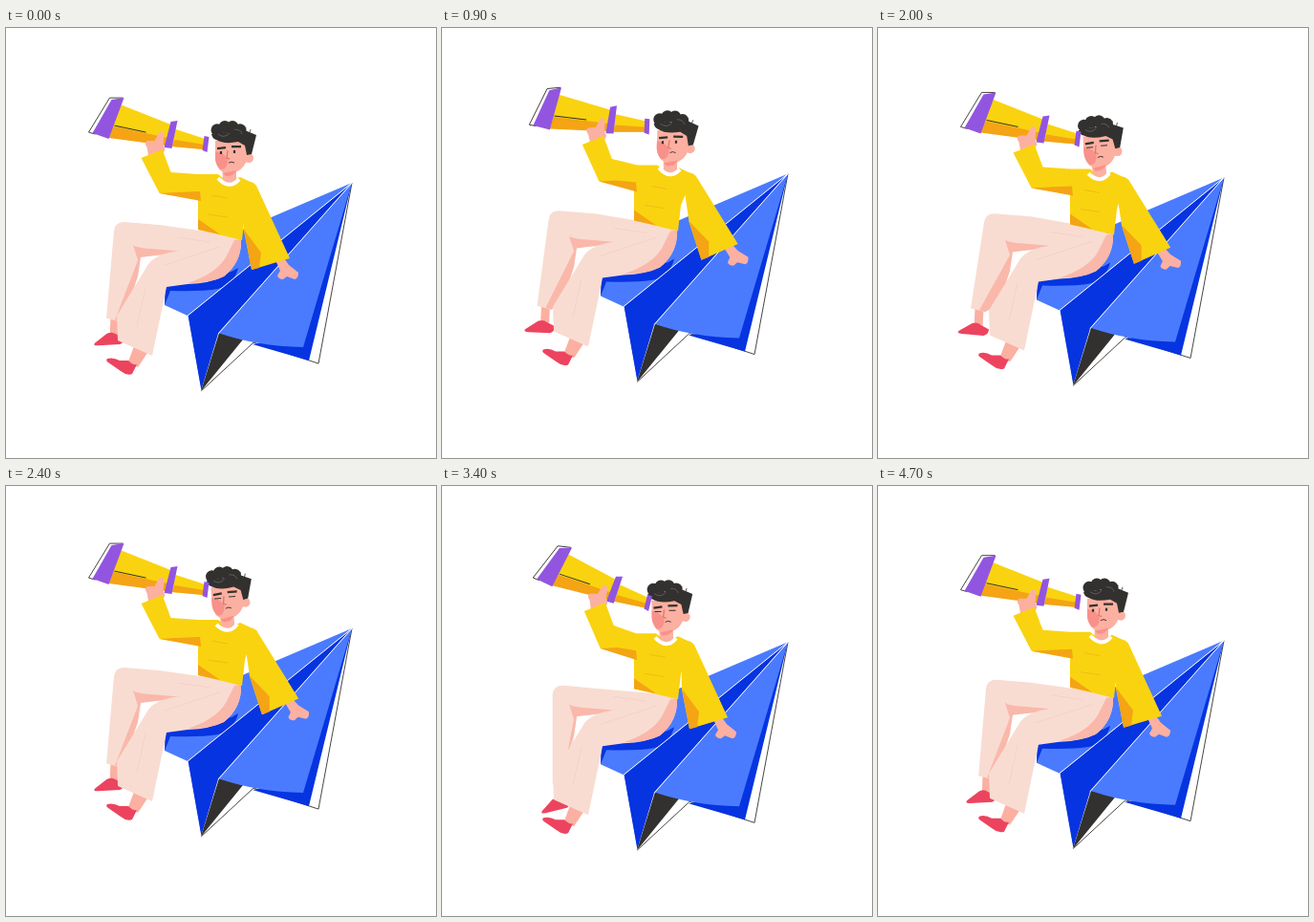
An HTML page with a canvas for the animation above (4.8 s loop, 450 px wide and 450 px high).

```html
<!DOCTYPE html>
<html>
<head>
<meta charset="utf-8">
<style>
html, body { margin: 0; width: 100%; height: 100%; overflow: hidden; background: #fff; }
canvas { display: block; }
</style>
</head>
<body>
<canvas id="stage" width="450" height="450"></canvas>
<script>
const ctx = document.getElementById('stage').getContext('2d');
const LOOP = 4800, STEP = 100, { sin, cos, PI } = Math;
const BRIGHT = '#4a7bff', DARK = '#0634e0', YELLOW = '#f9d310', ORANGE = '#f4a414',
  PURPLE = '#9255e0', CLOTH = '#f8dcd2', PINK = '#fab8aa', SKIN = '#fbb0a1',
  BLUSH = '#f8918a', RED = '#ec445f', INK = '#33312f';

const smooth = u => (u = Math.min(1, Math.max(0, u))) * u * (3 - 2 * u);
// Eases from 0 to 1 after `from`, and back to 0 after `to`
const hold = (t, from, to, ease) => smooth((t - from) / ease) - smooth((t - to) / ease);

function poseAt(t) {
  const a = 2 * PI * t / LOOP;
  const rise = hold(t, 900, 1400, 400) + hold(t, 2400, 3200, 400);
  const duck = hold(t, 400, 900, 500);
  const back = hold(t, 1600, 3900, 400);
  return {
    dy: .3 + 6.5 * cos(3 * a) - 1.7 * cos(2 * a),
    swing: -9 * sin(a) + 4 * sin(2 * a),
    arm: -7 * hold(t, 300, 2500, 600),
    lean: 4 * rise + 3.5 * duck,
    tube: { x: 209.5 + 13 * rise + 5.5 * duck, y: 117 - rise - 9 * duck, turn: 13 * rise - 5 * duck },
    head: { x: 6 * rise + 5 * duck - 2 * back, y: -duck, turn: 6 * rise + 2 * duck - 4 * back },
    squint: t > 1100 && t < 3500
  };
}

function fill(color, path) {
  ctx.fillStyle = color;
  ctx.fill(new Path2D(path));
}
function line(color, width, path) {
  ctx.strokeStyle = color;
  ctx.lineWidth = width;
  ctx.stroke(new Path2D(path));
}
function disc(color, x, y, r) {
  ctx.fillStyle = color;
  ctx.beginPath();
  ctx.arc(x, y, r, 0, 2 * PI);
  ctx.fill();
}
// Moves the pivot (px, py) to (x, y) and turns around it
function group(x, y, deg, px, py, draw) {
  ctx.save();
  ctx.translate(x, y);
  ctx.rotate(deg * PI / 180);
  ctx.translate(-px, -py);
  draw();
  ctx.restore();
}

function plane() {
  fill('#fff', 'M362 157L327 346L260 324L204 375L190 296Z');
  line(INK, .9, 'M362 157L327 346L259 324L204 375');
  fill(BRIGHT, 'M362 157L245 207L167 264L166 285L190 296Z');
  fill(DARK, 'M167 262L236 250L243 246Q239 263 222 268Q205 271 172 270L166 285Z');
  fill(DARK, 'M362 157L190 296L204 375L222 315Z');
  fill(INK, 'M223 314L248 321L204 375Z');
  fill(DARK, 'M362 157L317 343L258 326L300 318Z');
  fill(BRIGHT, 'M362 157L311 329Q262 328 222 314Z');
  line('#fff', 1, 'M362 157L190 296L204 375M362 157L222 315');
}

function legs(swing) {
  const footX = 109 + swing, footY = 320.5 + swing * .6;
  const kneeX = 113 + swing * .25, kneeY = 198 + swing * .4;
  const cuffX = footX + 4, cuffY = footY - 20;
  line(SKIN, 9, `M${cuffX + 1} ${cuffY - 3}L${footX + 4} ${footY - 1}`);
  group(footX, footY, -3 - swing, 0, 0, () =>
    fill(RED, 'M-16 3L-3 -6Q3 -8 6 -5L15 -1Q15 4 10 6L-13 6Q-19 6 -16 3Z'));
  fill(CLOTH, `M246 213L160 ${kneeY + 3}L${kneeX + 11} ${kneeY}Q${kneeX + 1} ${kneeY} ${kneeX} ${kneeY + 9}
    L${cuffX - 8} ${cuffY - 2}L${cuffX + 7} ${cuffY + 2}L141 234L185 232Z`);
  fill(PINK, `M${cuffX + 7} ${cuffY + 2}L126 290L138 255L141 235L187 229L152 226
    Q136 225 133 222L138 238L${cuffX + 1} ${cuffY}Z`);

  fill(SKIN, 'M134 328L148 335L138 350L128 344Z');
  fill(RED, 'M106 341Q112 339 119 343L128 343Q133 348 137 347L132 357Q126 359 120 354L107 345Q104 343 106 341Z');
  fill(CLOTH, `M246 216Q247 240 228 255Q214 262 190 263L168 266L153 338L117 322L116 296
    L149 242Q157 231 182 228L210 210Z`);
  fill(PINK, 'M246 216Q247 240 228 255Q214 262 190 262Q220 252 230 235L239 217Z');
  line('#f3cdc1', .7, 'M166 243L224 224M146 267L137 307M180 214L214 219');
}

function torso(lean, arm) {
  fill(YELLOW, `M${200 + lean} 148L${222 + lean} 148Q${233 + lean} 158 ${245 + lean} 151L${260 + lean} 158
    L250 190L247 217Q222 211 201 206L201 174Z`);
  fill(ORANGE, 'M201 195L224 211L201 206Z');
  line('#e8ad17', .6, `M${216 + lean} 170L${232 + lean} 173M212 190L232 193`);
  group(256 + lean, 158, arm, 256, 158, () => {
    fill(SKIN, 'M282 238L291 236L296 243L306 251Q306 257 302 258L294 255L290 258Q285 258 284 254L287 249Z');
    fill(YELLOW, 'M248 160Q255 152 262 160L297 236L257 248L249 207Z');
    fill(ORANGE, 'M249 206L267 230L265 246L257 248Z');
  });
}

function head({ x, y, turn }, squint) {
  group(234 + x, 152 + y, turn, 234, 152, () => {
    fill(SKIN, 'M226 138L241 136L241 154Q234 162 227 154Z');
    line('#fff', 4, 'M222 152Q234 165 244 153');
    disc(SKIN, 254, 131, 5);
    fill(SKIN, 'M219 113L254 112L253 130Q249 146 234 147Q221 147 219 132Z');
    fill(BLUSH, 'M219 124Q230 126 232 134Q231 144 224 143Q219 137 219 131Z');
    fill(BLUSH, 'M227 147L241 144Q239 150 230 150Z');
    for (let i = 0; i < 4; i++) disc(INK, 221 + 8 * i, 104 - 6 * sin(PI * (i + .5) / 4), 6.5);
    fill(INK, 'M215 106L250 102L262 107L257 127L252 128L250 118L243 114Q228 117 220 112Q216 111 215 106Z');
    line(INK, .8, 'M252 107Q249 102 251 99M254 107L256 101');
    line('#777', .6, 'M222 106Q228 111 234 105M239 101Q246 101 247 106');
    line(INK, 2.3, 'M221 121L230 120M236 119L246 119');
    if (squint) line(INK, 1, 'M222 125L229 125M237 124L244 124');
    else line(INK, 2.2, 'M225 124V127M239 123V126');
    line('#e2716b', 1.2, 'M232 123L231 131L234 132');
    line(INK, .9, 'M233 136Q236 134 239 136');
  });
}

function telescope({ x, y, turn }) {
  group(x, y, turn, 210, 117, () => {
    fill('#fff', 'M109 68L123 68L105 110L87 105Z');
    line(INK, .9, 'M123 68L109 68L87 104L94 106');
    fill(YELLOW, 'M120 75L173 96L168 118L108 109Z');
    fill(ORANGE, 'M113 98L170 110L168 118L108 110Z');
    line(INK, 1, 'M114 97L147 104');
    fill(YELLOW, 'M178 101L209 111L207 122L174 119Z');
    fill(ORANGE, 'M177 112L208 117L207 122L174 119Z');
    fill(PURPLE, 'M111 70L124 68L108 111L91 105Z');
    fill(PURPLE, 'M173 93L180 92L174 121L166 120Z');
    fill(PURPLE, 'M208 108L213 109L211 125L206 123Z');
  });
}

// The hand holds a fixed point of the telescope, the elbow follows
function raisedArm(lean, { x, y, turn }) {
  const a = turn * PI / 180;
  const handX = x - 52 * cos(a) + 4 * sin(a), handY = y - 52 * sin(a) - 4 * cos(a);
  const elbowX = 161 + (handX - 158) * .7, elbowY = 168 + (handY - 113) * .7;
  group(handX, handY, turn * .4, 0, 0, () =>
    fill(SKIN, 'M-8 18L-10 7Q-14 1 -9 0L-2 0L3 -9Q7 -11 8 -6L7 5L9 9L5 17Z'));
  fill(YELLOW, `M${handX - 16} ${handY + 18}L${handX + 6} ${handY + 9}L${handX + 15} ${handY + 33}
    L${201 + lean} 148L204 175L${elbowX} ${elbowY}Z`);
  fill(ORANGE, `M${elbowX} ${elbowY}L${elbowX + 18} ${elbowY - 1}L203 166L204 176Z`);
}

function draw(t) {
  const pose = poseAt(t);
  ctx.clearRect(0, 0, 450, 450);
  ctx.save();
  ctx.translate(0, pose.dy);
  plane();
  legs(pose.swing);
  torso(pose.lean, pose.arm);
  head(pose.head, pose.squint);
  telescope(pose.tube);
  raisedArm(pose.lean, pose.tube);
  ctx.restore();
}

const start = performance.now();
function tick() {
  const t = (performance.now() - start) % LOOP;
  draw(Math.floor(t / STEP) * STEP);
  requestAnimationFrame(tick);
}
tick();
</script>
</body>
</html>
```
